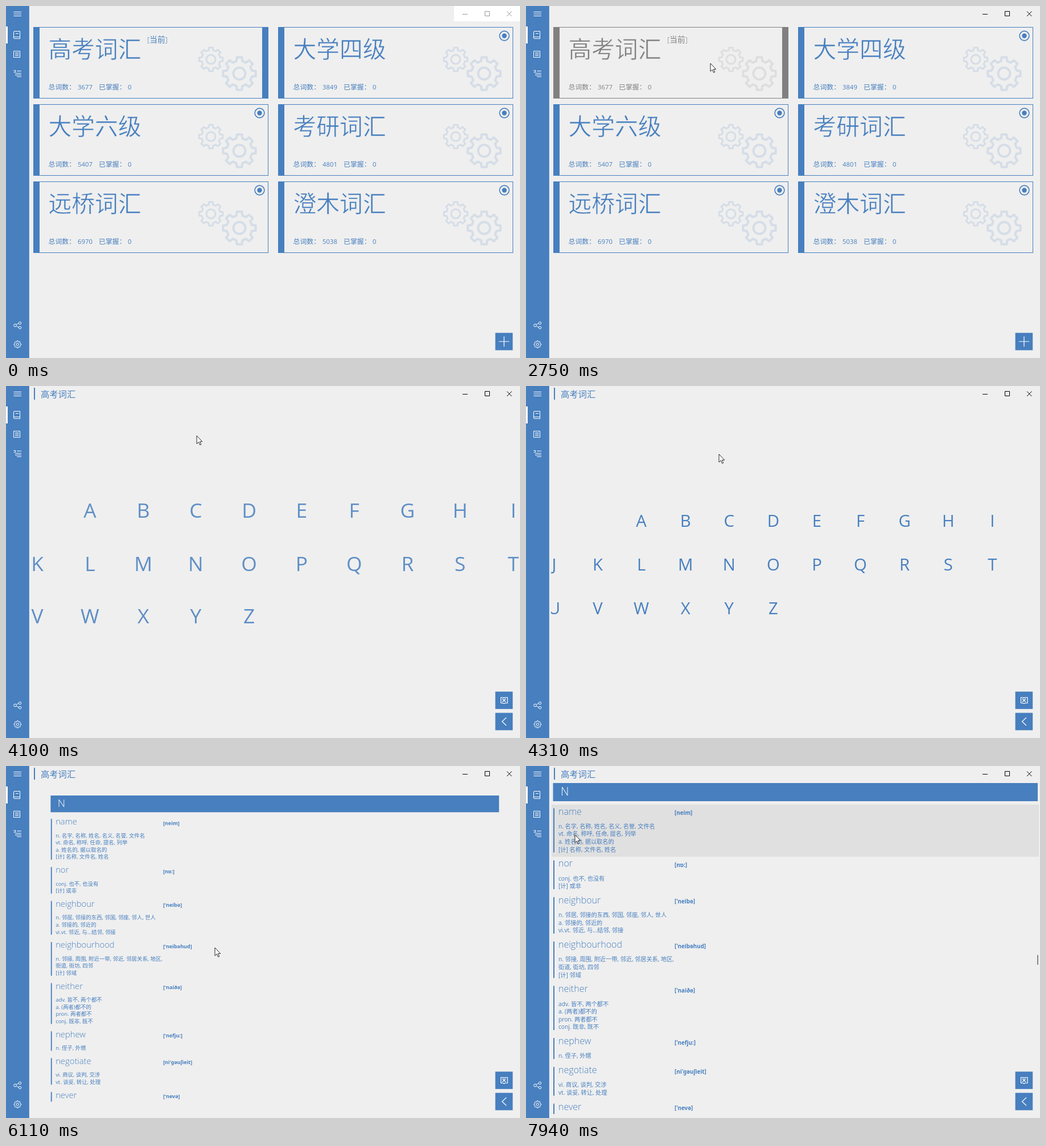
These frames come from a looping animation (903x620 px, 8 s). An HTML page:

```html
<!DOCTYPE html>
<html lang="zh-CN">
<head>
<meta charset="utf-8">
<style>
html, body { margin: 0; height: 100%; overflow: hidden; background: #efefef; }
svg { display: block; width: 903px; height: 620px; }
text { font-family: "Open Sans", "Noto Sans CJK SC", "Noto Sans CJK", sans-serif; white-space: pre; }
.light { font-weight: 300; }
.big { stroke: #efefef; stroke-width: .6; }
.ipa { font-family: "Noto Sans", "Open Sans", sans-serif; font-weight: 700; }
.line { fill: none; stroke: #fff; }
</style>
</head>
<body>
<svg id="stage" viewBox="0 0 903 620"></svg>
<script>
const BLUE = '#477fbf', GREY = '#808080', LOOP = 8000;

const cards = [
  ['高考词汇', 3677], ['大学四级', 3849], ['大学六级', 5407],
  ['考研词汇', 4801], ['远桥词汇', 6970], ['澄木词汇', 5038]
];

// word | pronunciation | meaning lines
const wordsA = `a|[ei]|第一个字母 A; 一个; 第一的|art. [计] 累加器, 加法器, 地址, 振幅, 模拟, 区|域, 面积, 汇编, 组件, 异步
air|[єə]|n. 空气, 旋律, 态度|vt. 晾, 使通风, 夸耀
aircraft|['єəkræft]|n. 航空器, 飞机|[机] 航空器
airline|['єəlain]|n. 航线, 航线的设备, 航空公司
airmail|['єəmeil]|n. 航空邮件
airplane|['єəplein]|n. 飞机|[机] 飞机
airport|['єəpɒ:t]|n. 飞机场|[机] 航空站, 机场
airspace|['єəspeis]|n. 空域, 空间|[机] 气隙
accent|['æksənt]|n. 重音, 口音, 特点, 注重点`;

const wordsN = `name|[neim]|n. 名字, 名称, 姓名, 名义, 名誉, 文件名|vt. 命名, 称呼, 任命, 提名, 列举|a. 姓名的, 据以取名的|[计] 名称, 文件名, 姓名
nor|[nɒ:]|conj. 也不, 也没有|[计] 或非
neighbour|['neibə]|n. 邻居, 邻接的东西, 邻国, 邻座, 邻人, 世人|a. 邻接的, 邻近的|vi.vt. 邻近, 与...结邻, 邻接
neighbourhood|['neibəhud]|n. 邻接, 周围, 附近一带, 邻近, 邻居关系, 地区,|街道, 街坊, 四邻|[计] 邻域
neither|['naiðə]|adv. 皆不, 两个都不|a. (两者)都不的|pron. 两者都不|conj. 既非, 既不
nephew|['nefju:]|n. 侄子, 外甥
negotiate|[ni'gəuʃieit]|vi. 商议, 谈判, 交涉|vt. 谈妥, 转让, 处理
never|['nevə]|adv. 从不, 决不`;

// time, x, y of the pointer
const path = [
  [330, 807, 622], [560, 480, 452], [1130, 300, 95], [1160, 300, 95], [1530, 310, 28], [1690, 310, 28],
  [2040, 314, 91], [2480, 314, 91], [2750, 324, 101], [2970, 324, 101], [3400, 322, 98], [3490, 322, 98],
  [3740, 330, 45], [3850, 330, 45], [4310, 339, 120], [4540, 420, 240], [4750, 420, 240], [4960, 385, 250],
  [5150, 385, 250], [5320, 370, 313], [5410, 367, 320], [6550, 367, 320], [6700, 368, 335], [7000, 200, 25],
  [7320, 97, 83], [7360, 95, 83], [7380, 91, 83], [7820, 91, 83], [7940, 86, 121]
];

const text = (x, y, size, s, attr = '') => `<text x="${x}" y="${y}" font-size="${size}" ${attr}>${s}</text>`;
const rect = (x, y, w, h, attr = '') => `<rect x="${x}" y="${y}" width="${w}" height="${h}" ${attr}/>`;
const circle = (x, y, r, attr = '') => `<circle cx="${x}" cy="${y}" r="${r}" ${attr}/>`;
const line = (d, attr = 'class="line"') => `<path d="${d}" ${attr}/>`;

function gear(x, y, outer, root, hole, width) {
  const pts = [], step = Math.PI / 4;
  for (let i = 0; i < 8; i++)
    for (const [k, r] of [[-.3, root], [-.2, outer], [.2, outer], [.3, root]]) {
      const a = (i + k) * step;
      pts.push((x + r * Math.sin(a)).toFixed(2) + ' ' + (y - r * Math.cos(a)).toFixed(2));
    }
  return `<g fill="none" stroke-width="${width}" stroke-linejoin="round">${line('M' + pts.join('L') + 'Z', '')}${circle(x, y, hole)}</g>`;
}

const cardBox = i => [48 + 430 * (i % 2), 38 + 136 * (i >> 1), 413, 125];

function card([name, total], i) {
  const [x, y, w, h] = cardBox(i);
  const mark = i
    ? circle(397.5, 14.5, 8.4, 'fill="none" stroke="currentColor" stroke-width="1.6"') + circle(397.5, 14.5, 4.2)
    : rect(402, 0, 11, h) + text(200, 26, 13.6, '[当前]', 'class="light"');
  return `<g class="card" transform="translate(${x} ${y})" fill="currentColor">` +
    rect(.5, -.5, w - 1, h, 'fill="none" stroke="currentColor"') + rect(0, 0, 11, h) + mark +
    text(26.5, 52.5, 40.8, name, 'class="light big"') +
    text(26.5, 108.5, 11.9, '总词数：') + text(78, 108.5, 11.3, total) +
    text(115, 108.5, 11.9, '已掌握：') + text(166, 108.5, 11.3, 0) +
    `<g stroke="currentColor" opacity=".15">${gear(312, 56, 21, 16.5, 8, 3)}${gear(362, 81, 29, 22.5, 10.5, 4)}</g></g>`;
}

const rowBoxes = { A: [], N: [] };

function list(letter, words) {
  let y = 68;
  const rows = words.split('\n').map(row => {
    const [word, ipa, ...lines] = row.split('|'), h = 37.4 + 13.6 * lines.length, top = y;
    rowBoxes[letter].push([45, top, 856, h]);
    y += h;
    return rect(45, top, 856, h, `class="row${letter}" fill="#e0e0e0"`) + rect(48, top + 6.5, 2, h - 14) +
      text(57, top + 17.6, 16, word, 'class="light"') + text(261, top + 18, 9.8, ipa, 'class="ipa"') +
      lines.map((s, i) => text(57, top + 41.8 + 13.6 * i, 10.2, s)).join('');
  });
  return `<g id="list${letter}" fill="${BLUE}" clip-path="url(#view)">` + rect(47.5, 30, 851.5, 32) +
    text(61, 52, 20, letter, 'class="light" fill="#fff"') + rows.join('') + '</g>';
}

const tileBoxes = [];

// Tiles fill rows of 11; the first two cells stay empty.
function tile(_, i) {
  const n = i + 2, x = Math.round(45.6 + 71.4 * (n % 11)), y = Math.round(207.4 + 71.4 * Math.floor(n / 11));
  tileBoxes.push([x, y, 68, 68]);
  return text(x + 34, y + 46, 27.2, String.fromCharCode(65 + i), 'text-anchor="middle"') +
    rect(x, y, 68, 68, 'class="tile" fill="#9db9db" fill-opacity=".5"');
}

const sidebar = rect(0, 0, 40.8, 620, `fill="${BLUE}"`) + rect(0, 36, 3, 30, 'fill="#fff"') +
  line('M13.5 10.5h13.5M13.5 14h13.5M13.5 17.5h13.5' +
    'M13.5 46q0-1.5 1.5-1.5h9.5v13h-9.5q-1.5 0-1.5-1.5zM13.5 54.5h11M17 48.5h5' +
    'M13.5 79.5h11v11h-11zM16 82.5h6.5M16 85h6.5M16 87.5h6.5' +
    'M13.5 113.5h3v3h-3M19 114.5h8M16 118.5h11M16 121.5h11M19 124.5h8' +
    'M18.5 561l3.5-2M18.5 564l3.5 2') +
  circle(16, 562.5, 2.4, 'class="line"') + circle(24.5, 558.5, 2.2, 'class="line"') + circle(24.5, 566.5, 2.2, 'class="line"') +
  `<g stroke="#fff">${gear(20.3, 596, 6.3, 5, 2.2, 1)}</g>`;

const button = (y, d) => rect(859.6, y, 30.6, 30.6, `fill="${BLUE}"`) + line(d, 'class="line" stroke-width="1.2"');

stage.innerHTML = `<clipPath id="view">${rect(44, 30, 857, 583)}</clipPath>` +
  rect(0, 0, 903, 620, 'fill="#efefef"') + sidebar +
  rect(787, 0, 116, 27, 'id="caption" fill="#fff"') +
  line('M802 14.5h9M841.5 9.5h8v8h-8zM880 9.5l8.5 8.5M888.5 9.5l-8.5 8.5', 'id="controls" fill="none"') +
  `<g id="home">${cards.map(card).join('')}${button(575.7, 'M875 582v18M866 591h18')}</g>` +
  `<g id="page">${rect(49, 3, 2, 21, `fill="${BLUE}"`)}${text(61, 20, 15.3, '高考词汇', `class="light" fill="${BLUE}"`)}` +
  `<g clip-path="url(#view)">${list('A', wordsA)}${list('N', wordsN)}` +
  `<g id="index" fill="${BLUE}">${Array.from({ length: 26 }, tile).join('')}</g></g>` +
  rect(898, 31, 2, 17, 'id="barA" fill="#868686"') + rect(898, 333, 2, 17, 'id="barN" fill="#868686"') +
  button(538.3, 'M869.5 548.5h4l1.5 1l1.5-1h4.5v10h-4.5l-1.5 1l-1.5-1h-4zM872 550.5l6 6M878 550.5l-6 6') +
  button(575.7, 'M879 584l-7.5 7l7.5 7') + '</g>' +
  line('M0 0V14.2L3.3 11.2L5.6 16.3L7.7 15.4L5.4 10.4H9.7Z', 'id="pointer" fill="#fff" stroke="#111" stroke-width=".9"');

const $ = id => document.getElementById(id);
const all = c => [...document.querySelectorAll('.' + c)];
const groups = { card: all('card'), tile: all('tile'), rowA: all('rowA'), rowN: all('rowN') };

const ramp = (t, start, len) => Math.min(1, Math.max(0, (t - start) / len));
const inside = ([x, y, w, h], [px, py]) => px >= x && px < x + w && py >= y && py < y + h;
const zoom = (s, cx) => `translate(${cx * (1 - s)} ${322 * (1 - s)}) scale(${s})`;

function show(id, opacity, transform = '') {
  const el = $(id);
  el.style.display = opacity > 0 ? '' : 'none';
  el.setAttribute('opacity', opacity);
  el.setAttribute('transform', transform);
}

function pointerAt(t) {
  const i = path.findIndex(p => p[0] > t);
  if (i < 0) return path.at(-1).slice(1);
  if (!i) return [807, 640];
  const [t0, x0, y0] = path[i - 1], [t1, x1, y1] = path[i];
  let u = (t - t0) / (t1 - t0);
  u *= u * (3 - 2 * u);
  return [x0 + (x1 - x0) * u, y0 + (y1 - y0) * u];
}

function draw(t) {
  const p = pointerAt(t);
  show('pointer', +(t >= 330), `translate(${p[0].toFixed(1)} ${p[1].toFixed(1)})`);
  show('caption', +(t < 1160));
  $('controls').setAttribute('stroke', t < 1160 ? '#999' : '#000');

  show('home', 1 - ramp(t, 2970, 90));
  groups.card.forEach((el, i) => el.style.color = inside(cardBox(i), p) ? GREY : BLUE);

  // The page rises in, then the letter index and the lists swap by zooming.
  show('page', ramp(t, 3060, 250));
  const rise = 85 * (1 - ramp(t, 3060, 400)) ** 3;
  const outA = ramp(t, 3830, 200), inIndex = ramp(t, 3830, 700);
  const outIndex = ramp(t, 5710, 200), inN = ramp(t, 5710, 700);
  show('listA', 1 - outA, `translate(0 ${rise}) ` + zoom(1 - .3 * outA, 460));
  show('index', ramp(t, 3930, 200) * (1 - outIndex), zoom(1 + .8 * (1 - inIndex) ** 2 + .4 * outIndex, 470));
  show('listN', ramp(t, 5810, 200), zoom(1 - .41 * (1 - inN) ** 2, 460));
  show('barA', ramp(t, 3300, 150) * +(t < 3830));
  show('barN', ramp(t, 6550, 150));

  const hover = (name, boxes, on) => groups[name].forEach((el, i) =>
    el.style.display = on && inside(boxes[i], p) ? '' : 'none');
  hover('rowA', rowBoxes.A, t > 3300 && t < 3830);
  hover('rowN', rowBoxes.N, t > 6480 && p[1] > 62);
  hover('tile', tileBoxes, t > 4480 && t < 5710);
}

function tick() {
  draw(performance.now() % LOOP);
  requestAnimationFrame(tick);
}
tick();
</script>
</body>
</html>
```
